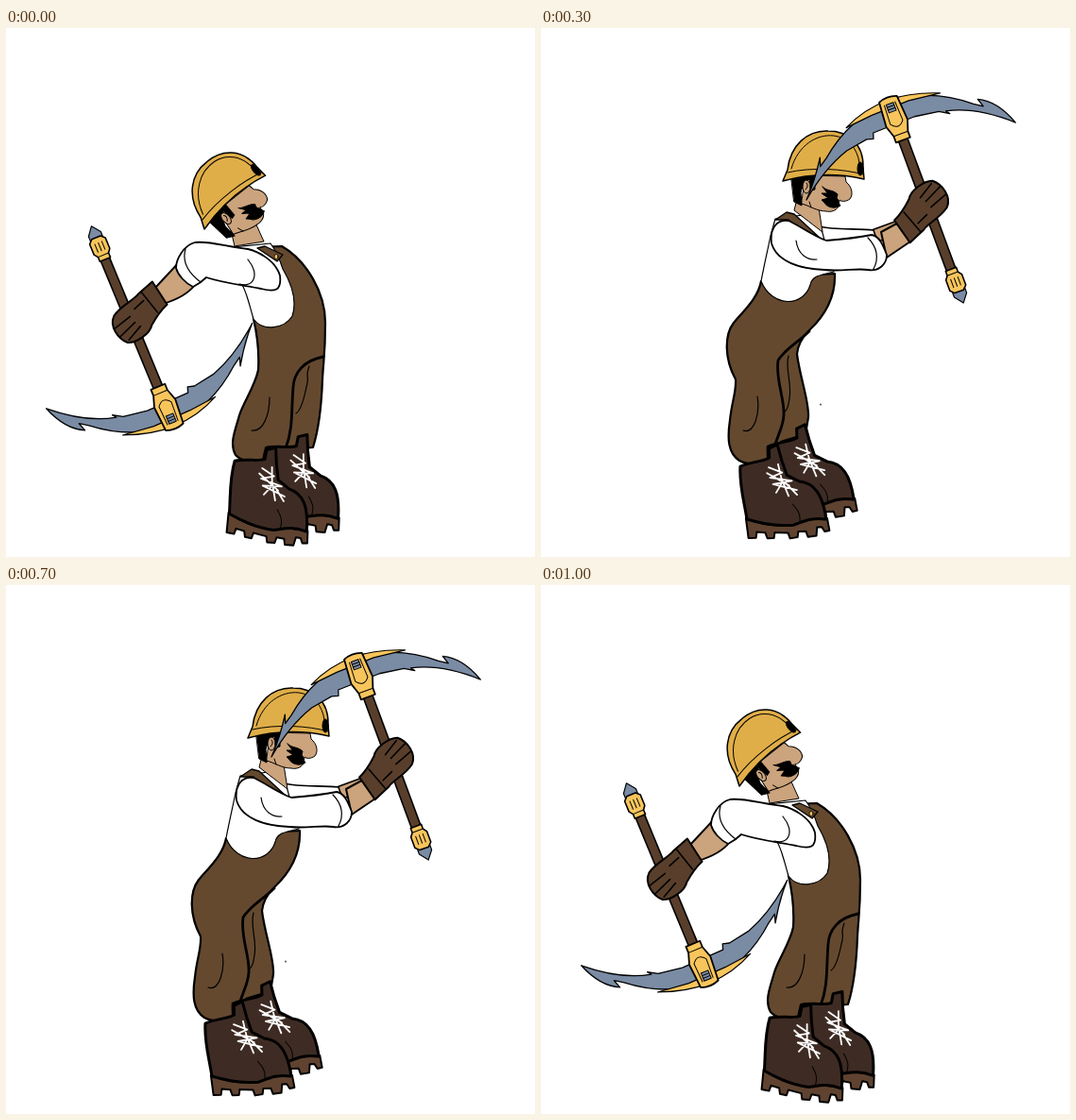
An HTML page that plays this animation: 560 px wide and 560 px high, repeating every 1.1 s.

```html
<!DOCTYPE html>
<html lang="en">
<head>
<meta charset="utf-8">
<title>Miner swinging a pickaxe</title>
<style>
  html, body { margin: 0; width: 100%; height: 100%; overflow: hidden; background: #fff; }
  svg { display: block; width: 100vw; height: 100vh; }
  path, ellipse { stroke: #000; stroke-linejoin: round; stroke-linecap: round; }
</style>
</head>
<body>
<svg id="stage" viewBox="0 0 560 560"></svg>
<script>
const BROWN = '#64492f', SKIN = '#cba37c', BOOT = '#3e2c24', SOLE = '#5f4330',
      GLOVE = '#593f2b', HELMET = '#e0ae48', GOLD = '#f8c55c', STEEL = '#7a8ba4';

const shape = (d, fill = 'none', w = 1.6, stroke = '#000') =>
  d ? `<path d="${d}" style="fill:${fill};stroke:${stroke};stroke-width:${w}"/>` : '';
const at = (x, y, turn, body) => `<g transform="translate(${x} ${y}) rotate(${turn})">${body}</g>`;

const boot =
  shape('M0 -3 C25 8 42 8 56 1 L86 0 L88 13 L83 14 L80 9 L75 9 L74 18 L65 19 L63 13 L55 13 L54 19 L46 20 L44 14 L30 13 L29 19 L22 19 L20 13 L11 12 L10 18 L2 18 Z', SOLE, 2) +
  shape('M-4 -58 C8 -63 20 -62 27 -66 L27 -76 L36 -80 L40 -63 L45 -47 L58 -40 C74 -38 82 -25 85 1 C68 -2 60 3 50 6 C32 7 16 3 1 -2 C-1 -20 -6 -38 -4 -58 Z', BOOT, 3) +
  shape('M50 -16 C55 -10 58 -6 57 2', 'none', 1) +
  shape('M26 -56 L40 -50 L27 -45 L50 -41 L30 -38 L55 -31 M36 -59 L39 -44 L46 -25 M24 -50 L47 -36 M40 -40 L33 -29 M44 -38 L55 -26', 'none', 1.8, '#fff');
const boots = at(30, -20, 0, boot) + boot;

const pick =
  shape('M48 -118 C34 -113 18 -104 11 -89 L20 -92 L14 -83 C-2 -64 -18 -38 -19 0 C-18 38 -2 64 14 83 L20 92 L11 89 C22 96 34 104 48 118 C32 99 20 78 14 60 L10 36 L12 29 L6 27 L5 -20 L9 -46 L15 -56 L11 -53 C16 -76 30 -98 48 -118 Z', STEEL, 1.3) +
  shape('M-9 -54 C-17 -34 -21 -16 -21 0 C-21 18 -17 36 -9 52 L-12 22 L-13 -20 Z', GOLD, 1.2) +
  shape('M20 -5 L172 -5 L172 5 L20 5 Z', GLOVE) +
  shape('M-22 -10 Q-26 0 -22 10 L5 12 L17 8 L24 8 L24 -8 L17 -8 L5 -12 Z', GOLD, 1.8) +
  shape('M-17 -6 L4 -7 Q13 0 4 7 L-17 6 M17 -8 V8', 'none', 1) +
  shape('M-17 -4 H-8 V4 H-17 Z M-14 -4 V4 M-11 -4 V4', STEEL, 1) +
  shape('M193 -7 L199 -7 L208 0 L199 7 L193 7 Z', STEEL, 1.2) +
  shape('M170 -6 H175 L179 -9 H191 L195 -5 V5 L191 9 H179 L175 6 H170 Z', GOLD) +
  shape('M175 -6 V6 M180 -4 H189 M180 0 H189 M180 4 H189', 'none', 1);

const glove =
  shape('M46 -13 L39 15 C28 14 20 16 12 18 C4 23 -13 19 -19 12 C-23 2 -20 -14 -8 -18 C5 -20 18 -14 26 -15 Z', GLOVE, 2) +
  shape('M-17 -8 L3 -5 M-20 2 L2 3 M-16 11 L3 10 M12 -7 L25 -6 M30 -14 L26 13', 'none', 1.6);

const head =
  shape('M24 -6 L66 -5 L67 1 C73 6 75 14 71 19 C67 22 62 22 60 20 L59 27 C56 32 50 33 46 32 C36 32 28 26 20 24 Z', SKIN, 1) +
  shape('M9 -4 L34 -6 L34 9 L30 10 L28 -2 L22 2 L19 12 L20 26 L12 22 Z', '#000', 1) +
  '<ellipse cx="25" cy="6" rx="4" ry="7" fill="' + SKIN + '"/>' +
  shape('M25 2 Q28 5 24 9 M28 22 L30 28', 'none', 1) +
  shape('M42 6 C47 11 53 9 58 14 L57 18 C60 20 58 23 61 26 C55 30 47 28 44 23 L41 20 L48 18 L41 13 L47 13 Z', '#000', 1) +
  shape('M0 0 L5 -12 C8 -38 26 -54 48 -53 C68 -53 86 -40 85 -14 L86 -2 C60 -8 30 -8 0 0 Z', HELMET, 1.5) +
  shape('M5 -9 C30 -15 65 -13 85 -7 M9 -13 C16 -38 36 -50 54 -48 C70 -46 79 -34 81 -19', 'none', 1) +
  '<ellipse cx="82" cy="-13" rx="3" ry="7"/>';

// Placements are [x, y, angle]; all other entries are outlines.
const back = {
  boots: [235, 516, 11], head: [210, 213, -40], pick: [170, 402, -112.5], glove: [133, 311, -47],
  legs: 'M262 232 L292 231 C318 246 338 280 338 312 C338 345 336 352 335 372 C334 400 331 425 325 444 L302 446 L290 458 C270 463 250 460 243 452 C236 440 243 425 247 410 C252 395 264 378 267 362 C268 345 266 325 262 308 Z',
  seam: 'M336 348 C315 352 305 365 304 380 C302 405 304 425 296 445',
  folds: 'M279 391 C279 410 272 428 260 426 M321 358 C316 372 322 365 318 380 C315 395 312 405 307 408',
  shirt: 'M240 232 L280 228 C286 236 290 246 293 255 C303 272 308 290 303 305 C295 318 272 322 262 308 C258 295 255 280 250 272 L240 240 Z',
  strap: 'M266 233 L274 231 L293 240 L287 247 Z',
  neck: 'M236 205 L242 231 L273 226 L264 206 Z',
  arm: 'M256 234 C235 232 215 225 200 227 C188 230 180 245 180 254 C182 262 190 270 198 274 C202 272 208 268 212 264 C230 270 250 272 270 276 C285 280 292 278 290 262 C285 245 265 236 256 234 Z',
  crease: 'M256 245 C268 260 264 275 247 271 M190 234 C186 248 194 260 206 269',
  forearm: 'M185 246 L158 275 L166 292 C180 288 192 282 200 272 Z',
  button: [286, 242]
};

const over = {
  boots: [223, 520, 6], head: [220, 192, -27], pick: [156, 121, -6.7], glove: [252, 108, 49],
  legs: 'M240 240 L296 238 C312 258 318 280 318 295 C316 315 306 328 304 340 C304 375 307 405 306 432 L284 440 L268 458 C250 462 235 463 226 457 C216 445 220 425 223 412 C227 398 236 385 236 370 C230 350 233 325 240 300 Z',
  seam: 'M300 342 C285 348 281 360 281 375 C279 400 280 420 272 445',
  folds: 'M254 385 C254 410 249 428 237 426 M292 360 C288 372 294 370 292 388 C290 402 286 412 283 412',
  shirt: 'M232 218 L268 215 C285 225 290 230 293 240 C288 255 290 275 286 293 C278 310 252 312 240 294 C238 280 238 268 235 260 L226 235 Z',
  strap: 'M227 232 L238 221 L264 219 L229 239 Z',
  neck: 'M237 200 L237 217 L270 215 L272 195 Z',
  arm: 'M252 269 C275 266 290 255 300 243 C310 225 320 205 320 190 C312 170 295 172 281 180 C282 186 285 190 287 195 C277 212 268 222 258 230 C246 234 235 245 236 258 C238 266 244 269 252 269 Z',
  crease: 'M262 229 C268 240 264 248 256 246 M286 194 C298 190 310 186 319 192',
  forearm: 'M304 176 L289 138 L266 146 C272 158 278 170 283 182 Z'
};

const mid = (a, b) => (a + b) / 2;
const blend = (p, q) => {
  if (Array.isArray(p)) return p.map((n, i) => mid(n, q[i]));
  const to = q.match(/[\d.]+/g);
  let i = 0;
  return p.replace(/[\d.]+/g, n => mid(+n, +to[i++]));
};
const rise = {};
for (const k in over) rise[k] = blend(back[k], over[k]);
Object.assign(rise, {
  pick: [95, 271, -58], glove: [148, 186, 8],
  arm: 'M262 240 C250 222 235 200 222 188 C208 178 192 180 186 188 C182 200 188 212 194 218 C200 216 206 214 210 216 C222 240 238 262 254 274 C268 272 276 262 272 252 C270 246 266 242 262 240 Z',
  crease: 'M250 236 C258 248 256 258 248 260 M200 183 C197 195 200 208 206 215',
  forearm: 'M198 182 L176 176 L172 198 C180 204 188 208 196 212 Z'
});

const front = {
  boots: [217, 522, -2], head: [256, 162, 0], pick: [375, 96, 69.7], glove: [411, 184, 131],
  legs: 'M280 262 L311 260 C312 285 300 305 284 320 C276 328 272 335 271 345 C274 370 284 395 283 412 L280 430 L254 438 L248 457 C235 462 222 464 210 458 C198 450 197 435 200 415 C202 395 207 385 206 372 C194 350 194 325 204 312 C216 298 230 285 233 268 Z',
  seam: 'M284 321 C272 333 258 340 251 352 C248 372 258 392 257 410 C256 425 250 430 247 445',
  folds: 'M229 390 C232 408 226 430 214 426 M262 347 C258 362 266 375 263 392 C262 400 260 405 258 406 M296 398 v1',
  shirt: 'M248 202 L285 197 C295 205 298 215 300 225 L310 258 C295 262 287 262 285 272 C278 295 245 297 233 268 C236 252 240 235 243 220 Z',
  strap: 'M248 203 L260 195 L268 197 L296 223 L288 224 L262 203 Z',
  neck: 'M270 185 L268 193 L298 216 L294 190 Z',
  farSleeve: 'M294 210 C310 214 335 212 352 214 L356 226 L300 226 Z',
  farArm: 'M350 214 L380 203 L384 212 L358 226 Z',
  arm: 'M262 204 C250 202 242 212 244 228 C250 248 275 255 300 256 C318 258 335 254 346 256 C358 258 366 250 366 240 C362 230 358 220 350 219 C335 222 315 224 302 225 C288 220 275 210 262 204 Z',
  crease: 'M270 225 C272 240 282 246 292 245 M346 222 C356 232 358 244 352 255',
  forearm: 'M360 216 L382 204 L394 224 L366 243 Z'
};

const low = {
  boots: [197, 518, 0], head: [237, 160, 0], pick: [439, 295, 146.7], glove: [359, 349, -152],
  legs: 'M270 222 L287 224 C292 240 292 260 290 275 C285 300 268 318 257 340 C257 365 264 395 262 415 L258 430 L232 438 L228 455 C212 462 200 464 188 456 C178 448 178 430 180 412 C181 395 188 385 186 370 C174 350 176 325 184 313 C194 298 205 285 214 264 Z',
  seam: 'M272 314 C255 326 240 338 232 350 C230 370 238 390 238 405 C238 420 232 428 232 445',
  folds: 'M210 388 C212 408 206 428 196 424 M243 343 C236 358 243 375 241 390 C240 398 239 402 238 404',
  shirt: 'M236 200 L262 197 C275 205 284 215 281 224 L269 224 C270 245 290 262 290 275 C290 290 262 292 244 288 C228 285 220 278 213 268 C218 245 222 220 228 206 Z',
  strap: 'M228 206 L240 196 L247 198 L274 226 L269 233 L245 204 Z',
  neck: 'M250 178 L246 187 L280 223 L276 192 Z',
  farSleeve: 'M290 266 C298 272 305 280 310 288 L300 296 L288 285 Z',
  farArm: 'M306 289 C318 294 330 305 338 320 L328 324 L300 298 Z',
  arm: 'M240 205 C226 210 220 225 222 240 C226 262 245 275 262 290 C268 300 275 306 285 312 C295 310 305 300 309 292 C298 285 290 275 286 272 C275 262 265 240 262 228 C258 212 250 204 240 205 Z',
  crease: 'M243 230 C236 240 241 255 250 262 M272 303 C286 300 294 290 294 280',
  forearm: 'M306 294 L336 320 L320 340 L286 312 Z',
  button: [273, 231]
};

const draw = p =>
  shape(p.farArm, SKIN) + shape(p.farSleeve, '#fff') +
  shape(p.legs, BROWN, 2.2) + shape(p.seam, 'none', 2.8) + shape(p.folds, 'none', 1.2) +
  at(...p.boots, boots) +
  shape(p.shirt, '#fff', 1.2) + shape(p.neck, SKIN, 1) + shape(p.strap, BROWN, 1.3) +
  (p.button ? `<ellipse cx="${p.button[0]}" cy="${p.button[1]}" rx="2" ry="2.5" fill="${GOLD}" stroke-width=".8"/>` : '') +
  at(...p.head, head) + at(...p.pick, pick) +
  shape(p.forearm, SKIN, 2) + at(...p.glove, glove) +
  shape(p.arm, '#fff', 1.8) + shape(p.crease, 'none', 1.2);

const stage = document.getElementById('stage');
stage.innerHTML = [back, rise, over, front, low].map(p => `<g visibility="hidden">${draw(p)}</g>`).join('');
const poses = [...stage.children];

// One pose per 100 ms: swing down, hold, swing back.
const order = [0, 1, 2, 3, 4, 4, 4, 3, 2, 1, 0];
const start = performance.now();
let shown;
function tick() {
  const t = Math.max(0, performance.now() - start) % 1100;
  const next = poses[order[Math.floor(t / 100)]];
  if (next !== shown) {
    if (shown) shown.setAttribute('visibility', 'hidden');
    next.setAttribute('visibility', 'visible');
    shown = next;
  }
  requestAnimationFrame(tick);
}
tick();
</script>
</body>
</html>
```
